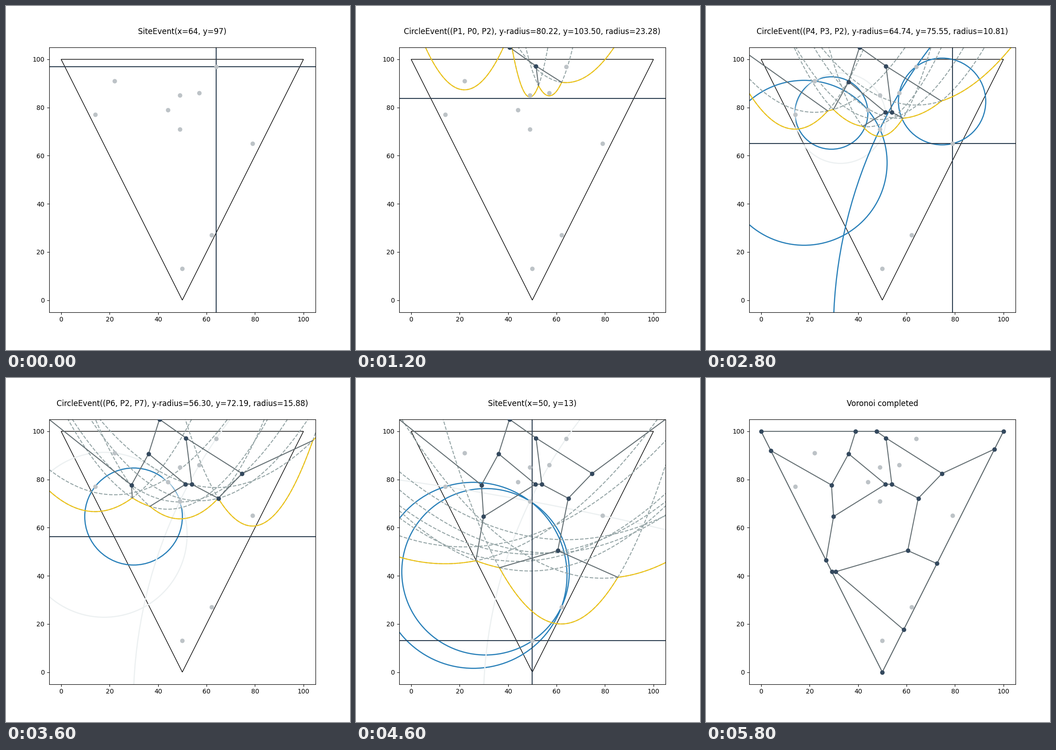
Recreate the animation shown at these times as a matplotlib script. Size 748 by 748 pixels, loop 6 s.

```python
import math
from itertools import combinations

import matplotlib.pyplot as plt
import numpy as np
from matplotlib.animation import FuncAnimation
from matplotlib.patches import Circle, Polygon

SITES = [(64, 97), (22, 91), (57, 86), (49, 85), (44, 79),
         (14, 77), (49, 71), (79, 65), (62, 27), (50, 13)]
TRIANGLE = [(50, 0), (100, 100), (0, 100)]
LOW, HIGH = -5, 105
FAR = -1e4  # sweep position used to extend unbounded edges

SWEEP, BEACH, ARC, EDGE = "#2c3e50", "#f1c40f", "#95a5a6", "#636e72"
VERTEX, SITE = "#34495e", "#bdc3c7"
VALID, INVALID = "#2980b9", "#ecf0f1"


def cross(o, p, q):
    return (p[0] - o[0]) * (q[1] - o[1]) - (p[1] - o[1]) * (q[0] - o[0])


def parabola(site, x, sweep):
    a, b = site
    return (x - a) ** 2 / (2 * (b - sweep)) + (b + sweep) / 2


def breakpoint_at(i, j, sweep):
    """Where arc i (left) meets arc j (right)."""
    (a, b), (c, d) = SITES[i], SITES[j]
    u, v = b - sweep, d - sweep
    qa = v - u
    qb = -2 * (v * a - u * c)
    qc = v * a * a - u * c * c + u * v * (b - d)
    x = (-qb + math.sqrt(max(qb * qb - 4 * qa * qc, 0))) / (2 * qa)
    return x, parabola(SITES[i] if u else SITES[j], x, sweep)


class SiteEvent:
    def __init__(self, index):
        self.index = index
        self.key = SITES[index][1]

    def __str__(self):
        return "SiteEvent(x=%d, y=%d)" % SITES[self.index]


class CircleEvent:
    def __init__(self, arcs):
        self.arc = arcs[1]
        self.sites = [arc.site for arc in arcs]
        self.valid = True
        (ax, ay), (bx, by), (cx, cy) = (SITES[s] for s in self.sites)
        bx, by, cx, cy = bx - ax, by - ay, cx - ax, cy - ay
        det = 2 * (bx * cy - by * cx)
        b2, c2 = bx * bx + by * by, cx * cx + cy * cy
        dx, dy = (cy * b2 - by * c2) / det, (bx * c2 - cx * b2) / det
        self.x, self.y, self.r = ax + dx, ay + dy, math.hypot(dx, dy)
        self.key = self.y - self.r

    def __str__(self):
        names = ", ".join(f"P{s}" for s in self.sites)
        return (f"CircleEvent(({names}), y-radius={self.key:.2f}, "
                f"y={self.y:.2f}, radius={self.r:.2f})")


class Arc:
    def __init__(self, site):
        self.site = site
        self.event = None

    def cancel(self):
        if self.event:
            self.event.valid = False


def run_sweep():
    """Fortune's algorithm; one snapshot per popped event."""
    queue = [SiteEvent(i) for i in range(len(SITES))]
    beach, vertices, steps = [], [], []
    sweep = HIGH

    def check(k):
        if 0 < k < len(beach) - 1:
            arcs = beach[k - 1:k + 2]
            if cross(*(SITES[arc.site] for arc in arcs)) < 0:
                beach[k].event = CircleEvent(arcs)
                queue.append(beach[k].event)

    while queue:
        event = max(queue, key=lambda e: e.key)
        queue.remove(event)
        if isinstance(event, SiteEvent):
            sweep = event.key
            new = Arc(event.index)
            if beach:
                x = SITES[event.index][0]
                k = sum(breakpoint_at(p.site, q.site, sweep)[0] < x
                        for p, q in zip(beach, beach[1:]))
                beach[k].cancel()
                old = beach[k].site
                beach[k:k + 1] = [Arc(old), new, Arc(old)]
                check(k)
                check(k + 2)
            else:
                beach.append(new)
        elif event.valid:
            sweep = event.key
            vertices.append((event.sites, (event.x, min(event.y, HIGH))))
            k = beach.index(event.arc)
            beach[k - 1].cancel()
            beach[k + 1].cancel()
            del beach[k]
            check(k - 1)
            check(k)
        circles = sorted((e for e in queue if isinstance(e, CircleEvent)),
                         key=lambda e: -e.key)
        steps.append(dict(
            title=str(event), sweep=sweep, vertices=vertices[:],
            beach=[arc.site for arc in beach],
            circles=[(e.x, e.y, e.r, e.valid) for e in circles]))
    return steps


def find_edges(step, sweep):
    """Pair up the two ends of every edge: finished vertices or breakpoints."""
    ends = {}
    for sites, pos in step["vertices"]:
        for pair in combinations(sorted(sites), 2):
            ends.setdefault(pair, []).append(pos)
    for i, j in zip(step["beach"], step["beach"][1:]):
        pair = (min(i, j), max(i, j))
        ends.setdefault(pair, []).append(breakpoint_at(i, j, sweep))
    return [e for e in ends.values() if len(e) == 2]


def clip_to_triangle(p, q):
    t0, t1 = 0, 1
    for a, b in zip(TRIANGLE, TRIANGLE[1:] + TRIANGLE[:1]):
        dp, dq = cross(a, b, p), cross(a, b, q)
        if dp < 0 and dq < 0:
            return None
        if dp < 0:
            t0 = max(t0, dp / (dp - dq))
        elif dq < 0:
            t1 = min(t1, dp / (dp - dq))
    if t0 >= t1:
        return None
    return [tuple(m + t * (n - m) for m, n in zip(p, q)) for t in (t0, t1)]


def draw_segments(segments):
    for p, q in segments:
        ax.plot([p[0], q[0]], [p[1], q[1]], color=EDGE)


def draw_dots(points, color):
    if points:
        ax.scatter(*zip(*points), color=color, zorder=10)


def draw_step(step):
    sweep = step["sweep"]
    for x, y, r, valid in step["circles"]:
        ax.add_patch(Circle((x, y), r, fill=False, lw=1.8,
                            color=VALID if valid else INVALID))
    ax.plot([LOW, HIGH], [sweep, sweep], color=SWEEP)
    xs = np.linspace(LOW, HIGH, 1000)
    curves = []
    for site in SITES:
        if site[1] == sweep:
            ax.axvline(site[0], color=SWEEP)
        elif site[1] > sweep:
            curves.append(parabola(site, xs, sweep))
            ax.plot(xs, curves[-1], "--", color=ARC)
    if curves:
        ax.plot(xs, np.min(curves, axis=0), color=BEACH)
    draw_segments(np.clip(find_edges(step, sweep), LOW, HIGH))
    draw_dots([pos for _, pos in step["vertices"]], VERTEX)


def draw_result(step):
    clipped = [clip_to_triangle(p, q) for p, q in find_edges(step, FAR)]
    segments = [s for s in clipped if s]
    draw_segments(segments)
    draw_segments(zip(TRIANGLE, TRIANGLE[1:] + TRIANGLE[:1]))
    points = {(round(x, 6), round(y, 6)) for s in segments for x, y in s}
    draw_dots(sorted(points) + TRIANGLE, VERTEX)


def draw(n):
    ax.clear()
    ax.set_xlim(LOW, HIGH)
    ax.set_ylim(LOW, HIGH)
    ax.add_patch(Polygon(TRIANGLE, fill=False, ec="black"))
    if n < len(steps):
        draw_step(steps[n])
        title = steps[n]["title"]
    else:
        draw_result(steps[-1])
        title = "Voronoi completed"
    draw_dots(SITES, SITE)
    ax.set_title(title + "\n")


steps = run_sweep()
fig, ax = plt.subplots(figsize=(7.48, 7.48), dpi=100)
anim = FuncAnimation(fig, draw, frames=len(steps) + 1, init_func=lambda: None,
                     interval=200, repeat=True, repeat_delay=0)
plt.show()
```
